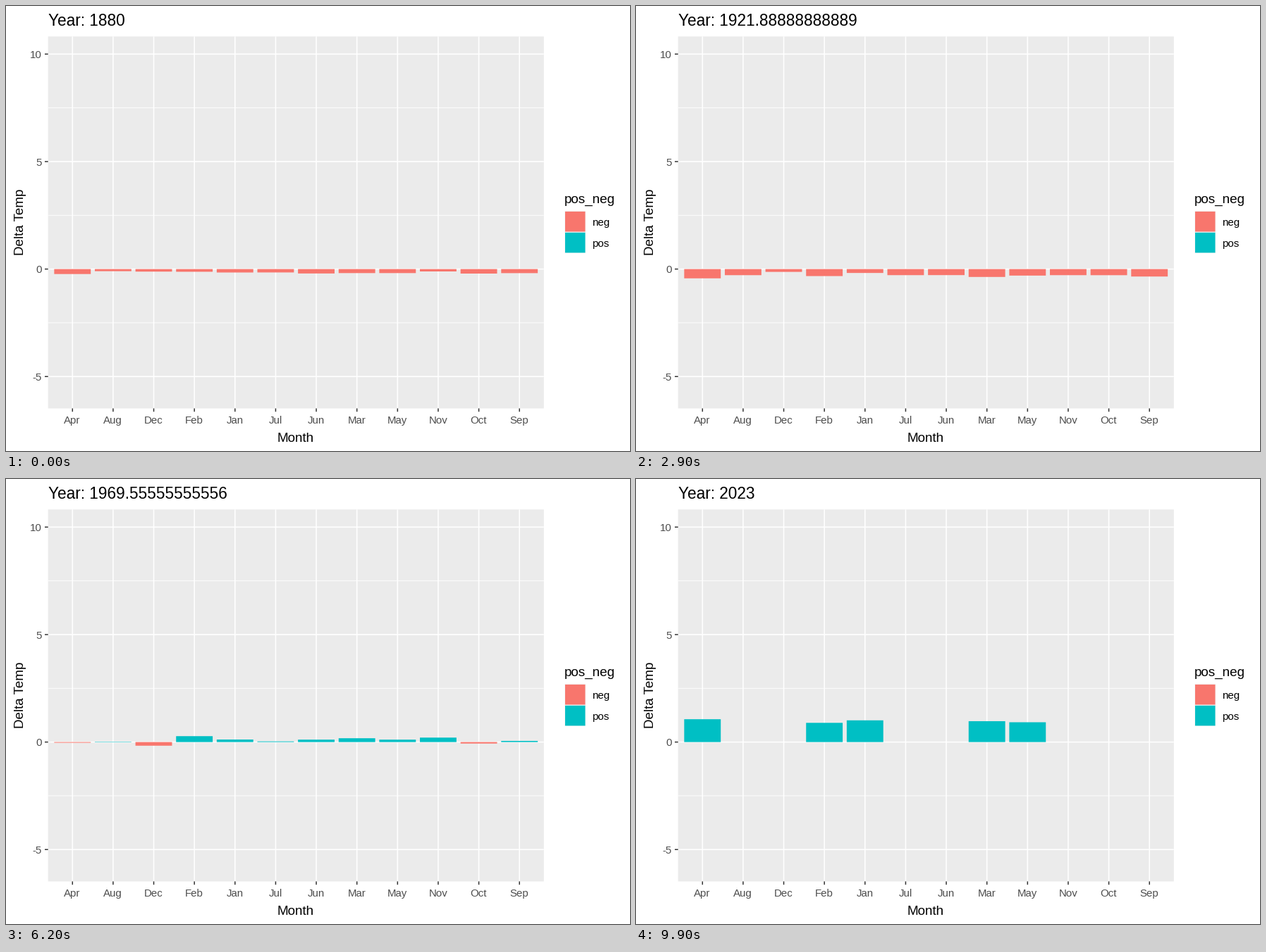
A matplotlib script that plays this animation: 885 px wide and 632 px high, repeating every 10 s.

```python
import matplotlib.pyplot as plt
import numpy as np
from matplotlib.animation import FuncAnimation
from matplotlib.patches import Rectangle

W, H, DPI = 885, 632, 64
FRAMES, FIRST, LAST = 100, 1880, 2023
STEP = (LAST - FIRST) / (FRAMES - 1)
NEG, POS = "#F8766D", "#00BFC4"
LEFT, RIGHT, TOP, BOTTOM = 59.7, 762.8, 43.3, 571.5
ZERO, UNIT = 373.6, 30.53
PITCH = (RIGHT - LEFT) / 12.2
CALENDAR = "Jan Feb Mar Apr May Jun Jul Aug Sep Oct Nov Dec".split()
MONTHS = sorted(CALENDAR)

# Turning points of the yearly mean anomaly
TREND = [(1880, -0.16), (1890, -0.30), (1896, -0.13), (1909, -0.45),
         (1915, -0.18), (1917, -0.42), (1922, -0.28), (1938, -0.03),
         (1944, 0.18), (1950, -0.14), (1958, 0.04), (1964, -0.15),
         (1969, 0.06), (1976, -0.08), (1981, 0.26), (1985, 0.14),
         (1990, 0.44), (1993, 0.23), (1998, 0.58), (2010, 0.67),
         (2016, 0.99), (2023, 1.00)]

plt.rcParams.update({"font.family": "Liberation Sans", "path.snap": False})
fig = plt.figure(figsize=(W / DPI, H / DPI), dpi=DPI, facecolor="white")
ax = fig.add_axes([0, 0, 1, 1])
ax.set(xlim=(0, W), ylim=(H, 0))
ax.axis("off")


def anomalies():
    """One row per year, one column per month in axis order."""
    years = np.arange(FIRST, LAST + 1)
    mean = np.interp(years, *zip(*TREND))
    # Winter months scatter more than summer ones
    spread = 0.08 + 0.04 * np.cos(np.arange(12) * np.pi / 6)
    noise = np.random.default_rng(7).normal(size=(len(years), 12)).clip(-2, 2)
    table = mean[:, None] + noise * spread
    table[-1, CALENDAR.index("Jun"):] = 0  # the record ends in May
    return table[:, [CALENDAR.index(m) for m in MONTHS]]


def box(x, y, w, h, color, z=1):
    return ax.add_patch(Rectangle((x, y), w, h, fc=color, lw=0, zorder=z))


def line(xs, ys, width, color="white"):
    ax.plot(xs, ys, color=color, lw=width * 72 / DPI,
            solid_capstyle="butt", zorder=2)


def label(x, y, text, size, color="black", va="baseline", **kw):
    return ax.text(x, y, text, size=size * 72 / DPI, color=color, va=va, **kw)


def level(v):
    return ZERO - v * UNIT


def month_x(k):
    return LEFT + (k + 0.6) * PITCH


# Panel, grid and axes
box(LEFT, TOP, RIGHT - LEFT, BOTTOM - TOP, "#EBEBEB")
for v in (7.5, 2.5, -2.5):
    line([LEFT, RIGHT], [level(v)] * 2, 0.9)
for v in (10, 5, 0, -5):
    y = level(v)
    line([LEFT, RIGHT], [y, y], 1.6)
    line([LEFT - 4.7, LEFT], [y, y], 1.5, "#333333")
    label(50.6, round(y + 5.6), str(v), 15, "#4D4D4D", ha="right")
for k, m in enumerate(MONTHS):
    x = month_x(k)
    line([x, x], [TOP, BOTTOM], 1.6)
    line([x, x], [BOTTOM, BOTTOM + 4.7], 1.5, "#333333")
    label(x - 0.3, 593, m, 15, "#4D4D4D", ha="center")
label(411, 619, "Month", 18.9, ha="center")
label(20.5, 307.3, "Delta Temp", 18.9, va="center", ha="center", rotation=90)
title = label(60, 28, "", 22.65)

# Legend
label(792, 280, "pos_neg", 18.9)
for y, name, color in ((291.2, "neg", NEG), (321.1, "pos", POS)):
    box(792.3, y, 29.8, 29.9, "#F2F2F2")
    box(793, y + 0.7, 28.5, 28.6, color, 2)
    label(831.5, round(y + 21), name, 15)

data = anomalies()
bars = [box(month_x(k) - 0.45 * PITCH, ZERO, 0.9 * PITCH, 0, NEG, 3)
        for k in range(12)]


def draw(i):
    title.set_text(f"Year: {FIRST + i * STEP:.15g}")
    # Show the first whole year that rounds to this frame
    row = max(0, int(np.ceil((i - 0.5) * STEP)))
    for bar, v in zip(bars, data[row]):
        bar.set_height(-v * UNIT)
        bar.set_facecolor(POS if v > 0 else NEG)
    return [title, *bars]


anim = FuncAnimation(fig, draw, frames=FRAMES, interval=100,
                     repeat=True, repeat_delay=0, blit=False)
plt.show()
```
